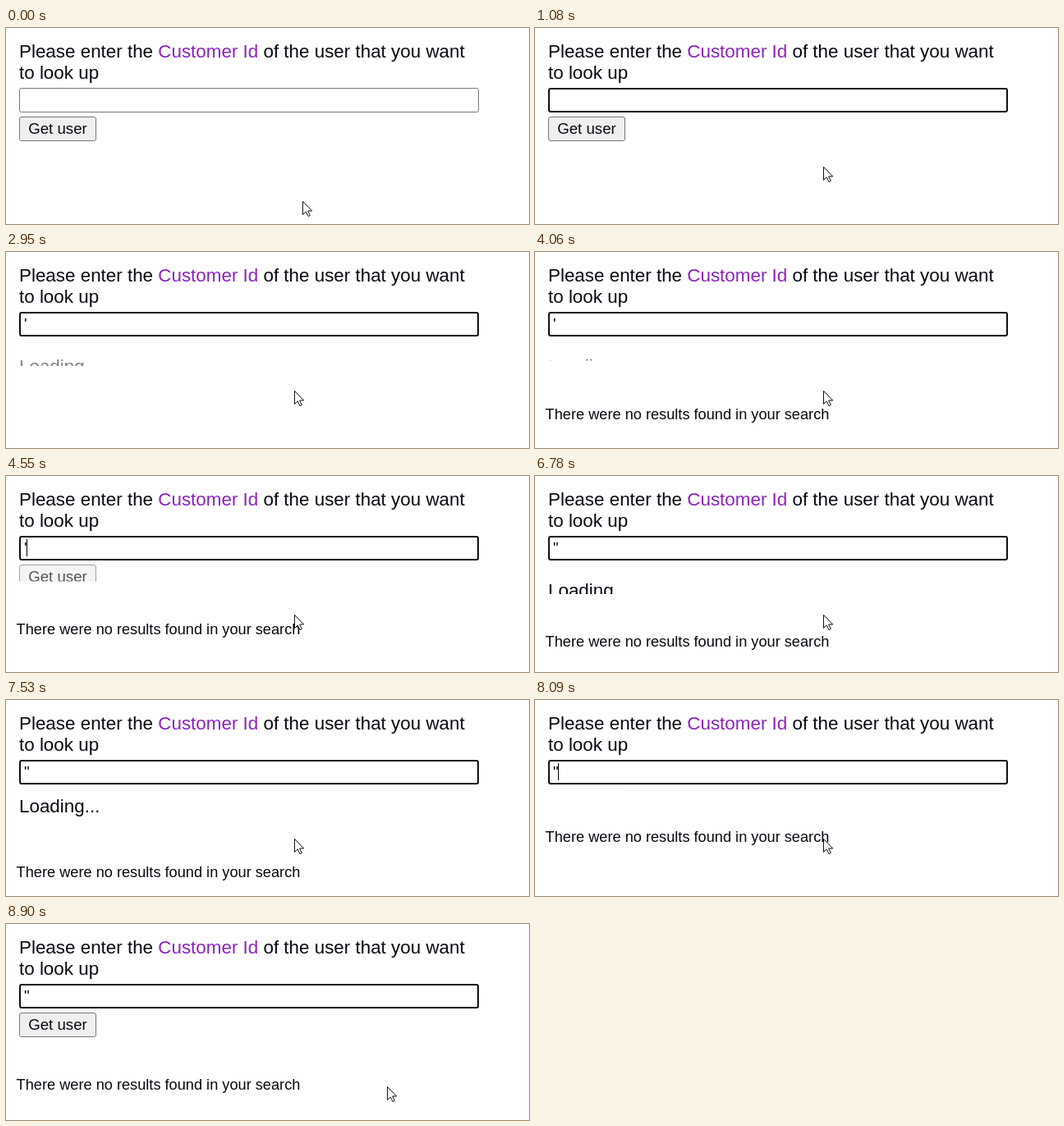
Recreate the animation shown at these times as an HTML page. Size 637 by 239 pixels, loop 8970 ms.

```html
<!DOCTYPE html>
<html lang="en">
<head>
<meta charset="utf-8">
<title>User lookup</title>
<style>
  html, body { margin: 0; width: 100%; height: 100%; overflow: hidden; background: #fff; }
  svg { display: block; overflow: hidden; }
  text { font-family: "Liberation Sans", Arial, sans-serif; fill: #080812; white-space: pre; }
  .large { font-size: 22.4px; }
  .control { font-size: 18.67px; }
  .note { font-size: 18.2px; }
</style>
</head>
<body>
<svg width="637" height="239" viewBox="0 0 637 239">
  <text class="large" x="16" y="36">Please enter the <tspan fill="#8c22bd">Customer Id</tspan> of the user that you want</text>
  <text class="large" x="16" y="62">to look up</text>

  <rect id="field" fill="#fff"/>
  <text id="typed" class="control" x="22" y="94"></text>
  <rect id="caret" y="77" width="1" height="21"/>

  <svg id="button" y="108" width="200" height="30">
    <rect x="16.5" y=".5" width="93" height="29" rx="2.5" fill="#efefef" stroke="#767676"/>
    <text class="control" x="27.2" y="21">Get user</text>
  </svg>
  <svg id="loading" y="108" width="200" height="36">
    <text id="loadingText" class="large" x="16" y="29">Loading...</text>
  </svg>
  <text id="result" class="note" x="12.6">There were no results found in your search</text>

  <g id="pointer">
    <path id="arrow" d="M.5 .5V16.5L4.3 13L7 18.6L9.3 17.6L6.7 12H11.7Z" fill="#fff" stroke="#111"/>
    <path id="beam" d="M-3 -8.5H-1L0 -7.5L1 -8.5H3M0 -7.5V7.5M-3 8.5H-1L0 7.5L1 8.5H3" fill="none" stroke="#111"/>
  </g>
</svg>
<script>
const LOOP = 8970, TOP = 108, BUTTON_H = 30, LOADING_H = 36;
const FOCUS = 550;

// Each search: submit, loading settles, answer arrives, loading leaves, button returns
const searches = [
  { submit: 2670, settle: 3430, answer: 3570, leave: 4000, restore: 4340 },
  { submit: 6290, settle: 7050, answer: 7250, leave: 7740, restore: 8080 }
];
const edits = [[FOCUS, "", 22], [2340, "'", 25], [5100, "", 22], [5830, '"', 28]];
const path = [
  [0, 361, 211], [70, 361, 204], [350, 352, 88], [620, 352, 88],
  [880, 351, 169], [8770, 351, 169], [8830, 401, 182], [8900, 464, 198]
];

const el = Object.fromEntries([...document.querySelectorAll("[id]")].map(n => [n.id, n]));
const set = (node, attrs) => {
  for (const key in attrs) node.setAttribute(key, attrs[key]);
};
const show = (node, on) => set(node, { visibility: on ? "visible" : "hidden" });
const progress = (t, start, length) => Math.min(1, Math.max(0, (t - start) / length));
const easeOut = p => 1 - (1 - p) ** 2;
const latest = (list, t, time) => list.filter(item => time(item) <= t).pop();

function drawPointer(t) {
  const i = path.findLastIndex(p => p[0] <= t);
  const from = path[i], to = path[i + 1] || from;
  const p = to === from ? 0 : progress(t, from[0], to[0] - from[0]);
  const x = Math.round(from[1] + (to[1] - from[1]) * p);
  const y = Math.round(from[2] + (to[2] - from[2]) * p);
  const overField = y > 73 && y < 103;
  set(el.pointer, { transform: `translate(${x} ${y})` });
  show(el.arrow, !overField);
  show(el.beam, overField);
  return overField;
}

function drawField(t, hovered) {
  const focused = t >= FOCUS, line = focused ? 2 : 1;
  set(el.field, {
    x: 16 + line / 2, y: 73 + line / 2, width: 560 - line, height: 30 - line,
    rx: 2, "stroke-width": line,
    stroke: focused ? "#101010" : hovered ? "#4f4f4f" : "#767676"
  });
  const edit = latest(edits, t, e => e[0]);
  el.typed.textContent = edit ? edit[1] : "";
  show(el.caret, edit && Math.floor((t - edit[0]) / 530) % 2 === 0);
  if (edit) set(el.caret, { x: edit[2] });
}

function drawPanel(t) {
  const s = latest(searches, t, item => item.submit);
  let button = 1, height = 0, fade = 0, gap = 0, shifted = false;
  if (s) {
    const leaving = easeOut(progress(t, s.leave, 340));
    button = t < s.restore ? 1 - progress(t, s.submit, 130)
                           : easeOut(progress(t, s.restore, 480));
    height = easeOut(progress(t, s.submit + 130, 240)) * (1 - leaving);
    fade = progress(t, s.submit + 130, 300) * (1 - leaving);
    shifted = t < s.settle || t >= s.leave;
    if (t < s.submit + 130) gap = 2;
    else if (t >= s.answer && t < s.restore) gap = 8 * easeOut(progress(t, s.answer, 280));
  }
  const buttonH = BUTTON_H * button, loadingH = LOADING_H * height;
  set(el.button, { height: buttonH, opacity: button });
  set(el.loading, { height: loadingH, opacity: fade });
  set(el.loadingText, { y: shifted ? 38.5 : 29 });

  const first = searches[0].answer, arrival = easeOut(progress(t, first, 400));
  const rise = 24 * (1 - arrival);
  show(el.result, t >= first);
  set(el.result, {
    y: Math.round(TOP + buttonH + loadingH + 64 + gap + rise),
    opacity: arrival
  });
}

const start = performance.now();
function frame() {
  const t = (performance.now() - start) % LOOP;
  drawField(t, drawPointer(t));
  drawPanel(t);
  requestAnimationFrame(frame);
}
frame();
</script>
</body>
</html>
```
